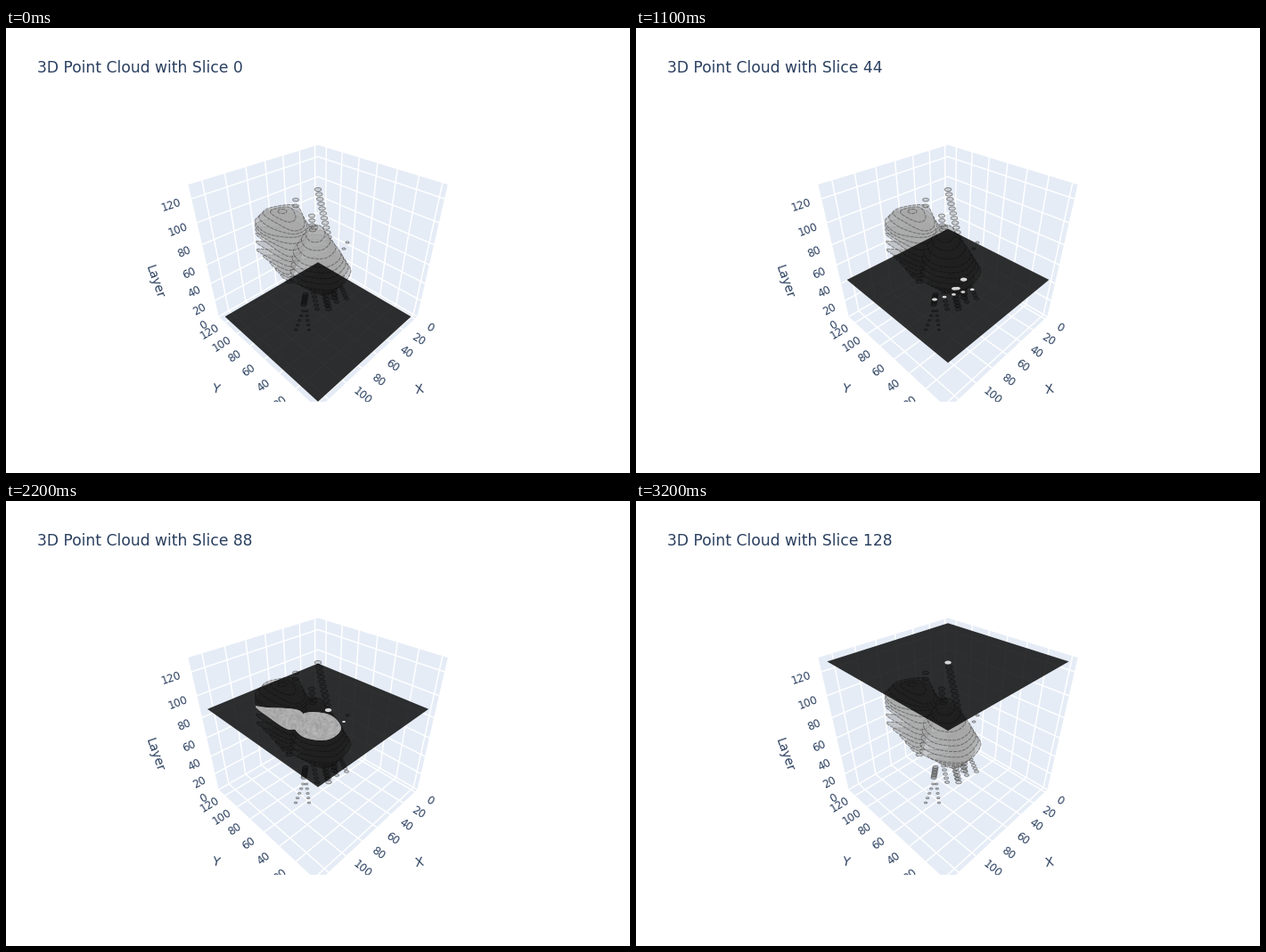
Animation, 700 px wide and 500 px high, one loop 3300 ms. Source, as a matplotlib script:

```python
import numpy as np
import matplotlib.pyplot as plt
from matplotlib.animation import FuncAnimation
from matplotlib.patches import PathPatch, Polygon
from matplotlib.path import Path

W, H, DPI = 700, 500, 100
TOP, BOTTOM = 100, 420
FRAMES, INTERVAL, STEP = 33, 100, 4
INK, WALL = "#2a3f5f", "#e5ecf6"
FOCAL = 160 / np.tan(np.radians(22.5))
EYE = 1.25 * np.sqrt(3)
PLANE = 0.469   # half width of the slice in the unit cube
GAP = 0.12      # distance of tick labels from the cube

plt.rcParams["font.family"] = "DejaVu Sans"


def px(size):
    return size * 72 / DPI


def project(x, y, z):
    depth = EYE - (x + y + z) / np.sqrt(3)
    return np.array([350 + FOCAL * (y - x) / np.sqrt(2) / depth,
                     260 - FOCAL * (2 * z - x - y) / np.sqrt(6) / depth])


def x_pos(v):
    return (v - 63.5) / 135.4


def y_pos(v):
    return -x_pos(v)


def z_pos(v):
    return v / 131 - 0.5


def oval(cx, cy, rx, ry, tilt=0, n=6):
    t = np.pi + np.arange(n) * 2 * np.pi / n
    u, v, a = rx * np.cos(t), ry * np.sin(t), np.radians(tilt)
    return np.column_stack([cx + u * np.cos(a) - v * np.sin(a),
                            cy + u * np.sin(a) + v * np.cos(a)])


def smooth(pts, n=8):
    """Closed Catmull-Rom curve through pts."""
    a, b, c, d = (np.roll(pts, k, axis=0)[:, None] for k in (1, 0, -1, -2))
    t = (np.arange(n) / n)[None, :, None]
    curve = 0.5 * (2 * b + (c - a) * t + (2 * a - 5 * b + 4 * c - d) * t**2
                   + (3 * b - a - 3 * c + d) * t**3)
    return curve.reshape(-1, 2)


def blend(keys, z):
    """Outline at layer z between key outlines, None outside them."""
    zs = sorted(keys)
    if not zs[0] <= z <= zs[-1]:
        return None
    i = min(np.searchsorted(zs, z, side="right"), len(zs) - 1)
    lo, hi = zs[i - 1], zs[i]
    a, b = np.array(keys[lo], float), np.array(keys[hi], float)
    return smooth(a + (b - a) * (z - lo) / (hi - lo))


def compound(polys):
    if not polys:
        polys = [np.full((3, 2), -9.0)]
    return Path.make_compound_path(
        *[Path(np.vstack([p, p[:1]]), closed=True) for p in polys])


# Lobe outlines on screen, clockwise from the left tip, by layer
LEFT = {
    60: oval(318, 285, 4, 2),
    72: [(296, 263), (307, 261), (319, 261), (325, 267), (317, 277), (304, 271)],
    80: [(281, 249), (300, 249), (324, 250), (331, 258), (320, 268), (297, 259)],
    88: [(280, 231), (292, 232), (328, 235), (334, 248), (318, 257), (292, 241)],
    100: oval(310, 221, 31, 14, 8),
    108: [(288, 208), (300, 201), (326, 200), (335, 221), (323, 228), (303, 219)],
    116: oval(310, 206, 5, 2.5),
}
RIGHT = {
    60: oval(356, 296, 10, 4),
    72: [(318, 280), (350, 278), (372, 261), (387, 273), (370, 293), (336, 291)],
    88: oval(349, 253, 27, 16, 6),
    100: oval(347, 231, 11, 10),
    104: oval(346, 224, 4, 2),
}

# Vessels: radius, start (layer, x, y), end (layer, x, y)
VESSELS = [
    (3.8, (24, 368, 303), (72, 367, 254)),
    (3.8, (76, 365, 251), (128, 350, 181.5)),
    (3.6, (100, 344, 227), (112, 343, 211)),
    (3.3, (20, 362, 316), (76, 351, 262)),
    (3.0, (28, 334, 311), (60, 336, 299)),
    (3.2, (40, 361, 297), (72, 358, 262)),
    (3.4, (112, 325, 200), (116, 325, 193)),
    (2.0, (88, 379, 248), (92, 383, 241)),
]
# Fan of small branches below the body
VESSELS += [(2.5, (32, 349 + 11 * k, 316 - 4 * k), (52, 344 + 10 * k, 293 - 2 * k))
            for k in range(4)]
VESSELS += [(1.7, (8, x, 339), (24, 335 + (x - 332) / 4, 318)) for x in (325, 340)]


def lobes(z):
    return [p for p in (blend(LEFT, z), blend(RIGHT, z)) if p is not None]


def spots(z):
    out = []
    for r, a, b in VESSELS:
        if a[0] <= z <= b[0]:
            t = (z - a[0]) / (b[0] - a[0])
            cx, cy = (a[k] + (b[k] - a[k]) * t for k in (1, 2))
            out.append(oval(cx, cy, r, 0.55 * r, n=16))
    return out


def hollow(z):
    size = 1 - abs(z - 72) / 7
    return [oval(369, 277 - 1.3 * (z - 72), 10 * size, 7 * size, n=20)] if size > 0 else []


fig = plt.figure(figsize=(W / DPI, H / DPI), dpi=DPI, facecolor="white")
ax = fig.add_axes([0, 1 - BOTTOM / H, 1, (BOTTOM - TOP) / H])
ax.axis("off")


def face(corners):
    ax.add_patch(Polygon([project(*c) for c in corners], fc=WALL, ec="none", zorder=1))


def grid(a, b):
    (x0, y0), (x1, y1) = project(*a), project(*b)
    ax.plot([x0, x1], [y0, y1], color="white", lw=px(1.5), zorder=2)


def label(x, y, text, size, turn):
    ax.text(x, y, text, color=INK, fontsize=px(size), ha="center", va="center",
            rotation=turn, rotation_mode="anchor", clip_on=True, zorder=3)


def tick(v, edge, out):
    """Tick label beside the cube, turned along its outward direction."""
    p, q = project(*edge), project(*np.add(edge, out))
    dx, dy = (q - p) * np.sign(q[0] - p[0])
    label(*q, str(v), 12, np.degrees(np.arctan2(-dy, dx)))


h = 0.5
face([(-h, -h, -h), (h, -h, -h), (h, -h, h), (-h, -h, h)])
face([(-h, -h, -h), (-h, h, -h), (-h, h, h), (-h, -h, h)])
face([(-h, -h, -h), (h, -h, -h), (h, h, -h), (-h, h, -h)])

for v in range(0, 121, 20):
    x, y, z = x_pos(v), y_pos(v), z_pos(v)
    grid((x, -h, -h), (x, -h, h))
    grid((x, -h, -h), (x, h, -h))
    grid((-h, y, -h), (-h, y, h))
    grid((-h, y, -h), (h, y, -h))
    grid((-h, -h, z), (h, -h, z))
    grid((-h, -h, z), (-h, h, z))
    tick(v, (x, h, -h), (0, GAP, 0))
    tick(v, (h, y, -h), (GAP, 0, 0))
    tick(v, (h, -h, z), (GAP, 0, 0))

label(464, 406, "X", 14, 10)
label(236, 406, "Y", 14, -10)
label(166.5, 285, "Layer", 14, -71)

# Point cloud: one translucent outline per layer
for z in range(0, 132, STEP):
    for poly in lobes(z):
        ax.add_patch(Polygon(poly, fc=(0.66, 0.66, 0.66, 0.6), ec="none", zorder=4))
        ax.add_patch(Polygon(poly, fill=False, ec=(0.2, 0.2, 0.2, 0.5),
                             lw=px(1), ls=(0, (4, 1)), zorder=4))
    for poly in spots(z):
        ax.add_patch(Polygon(poly, fc=(0.6, 0.6, 0.6, 0.35),
                             ec=(0.2, 0.2, 0.2, 0.5), lw=px(1), zorder=4))


def layer_patch(color, order):
    return ax.add_patch(PathPatch(compound([]), fc=color, ec="none", zorder=order))


plane = layer_patch((0, 0, 0, 0.81), 5)
tissue = layer_patch("#aaaaaa", 6)
noise = np.random.default_rng(4).normal(0.67, 0.035, (60, 66))
grain = ax.imshow(noise, cmap="gray", vmin=0, vmax=1, extent=(270, 402, 310, 190),
                  aspect="auto", interpolation="bilinear", zorder=7)
cavity = layer_patch("#282828", 8)
vessel = layer_patch("#d6d6d6", 9)
ax.set_xlim(0, W)
ax.set_ylim(BOTTOM, TOP)
title = fig.text(35 / W, 1 - 50 / H, "", color=INK, fontsize=px(17.1),
                 ha="left", va="baseline")


def update(i):
    layer = i * STEP
    z, a = z_pos(layer), PLANE
    corners = [project(x, y, z) for x, y in ((-a, -a), (a, -a), (a, a), (-a, a))]
    plane.set_path(compound([np.array(corners)]))
    cut = lobes(layer)
    path = compound(cut)
    tissue.set_path(path)
    grain.set_visible(bool(cut))
    grain.set_clip_path(path, ax.transData)
    cavity.set_path(compound(hollow(layer)))
    vessel.set_path(compound(spots(layer)))
    title.set_text(f"3D Point Cloud with Slice {layer}")
    return plane, tissue, grain, cavity, vessel, title


anim = FuncAnimation(fig, update, frames=FRAMES, interval=INTERVAL,
                     repeat=True, repeat_delay=0, blit=False)
plt.show()
```
